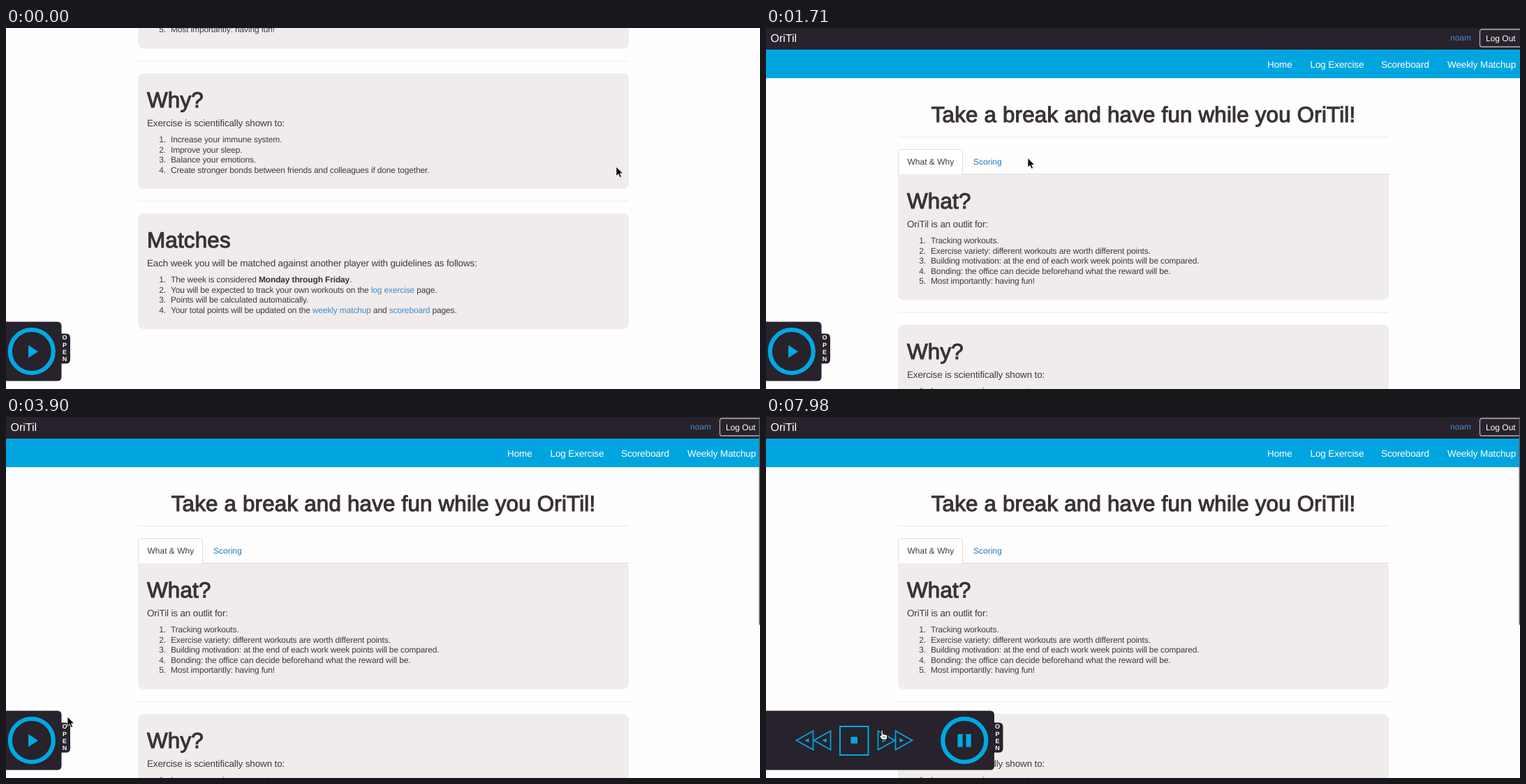
Write an HTML page that moves like this. It is 1080x518 px and loops after 8 s.

```html
<!DOCTYPE html>
<html>
<head>
<meta charset="utf-8">
<style>
html, body { margin: 0; width: 100%; height: 100%; overflow: hidden; background: #fefefe; }
svg { display: block; }
text { font: 12px "Liberation Sans", Arial, sans-serif; fill: #413b3c; text-rendering: geometricPrecision; white-space: pre; }
.h { font-size: 31.4px; letter-spacing: .16px; fill: #3a3233; stroke: #3a3233; stroke-width: 1.1px; }
.p { font-size: 13.5px; letter-spacing: -.15px; }
.lead { font-size: 17.8px; letter-spacing: -.18px; }
.li { letter-spacing: -.15px; }
.nav { font-size: 13.5px; letter-spacing: -.1px; fill: #fff; }
.brand { font-size: 16px; fill: #fff; }
.w { fill: #fff; }
.open { font-size: 9px; font-weight: bold; fill: #fff; text-anchor: middle; }
.a { fill: #428bca; }
.tab { fill: #2378c3; }
.b { font-weight: bold; fill: #3a3233; }
.i { font-style: italic; }
</style>
</head>
<body>
<svg id="stage" width="1080" height="518"></svg>
<script>
const BLUE = '#00a9e2', DARK = '#27222b', PANEL = '#f0eceb';
const text = (x, y, s, cls = '', more = '') => `<text x="${x}" y="${y}" class="${cls}" ${more}>${s}</text>`;
const span = (cls, s) => `<tspan class="${cls}">${s}</tspan>`;
const link = s => span('a', s);
const rect = (x, y, w, h, fill, r = 0, more = '') =>
  `<rect x="${x}" y="${y}" width="${w}" height="${h}" rx="${r}" fill="${fill}" ${more}/>`;
const rule = y => rect(189, y, 703, 1, '#ececec');
const path = (d, fill, more = '') => `<path d="${d}" fill="${fill}" ${more}/>`;
const group = (id, s) => `<g id="${id}">${s}</g>`;

const panel = (y, h, flatTop) => rect(189, y, 703, h, PANEL, 8) + (flatTop ? rect(189, y, 703, 12, PANEL) : '');
const list = (y, items) => items.map((s, i) =>
  text(229, y + i * 14.6, i + 1 + '.', 'li', 'text-anchor="end"') + text(236, y + i * 14.6, s, 'li')).join('');
const section = (y, title, intro, items, flatTop) =>
  panel(y, 107.6 + items.length * 14.6, flatTop) + text(202, y + 49, title, 'h') +
  text(202, y + 76, intro, 'p') + list(y + 99, items);

const why =
  section(210, 'What?', 'OriTil is an outlit for:', [
    'Tracking workouts.',
    'Exercise variety: different workouts are worth different points.',
    'Building motivation: at the end of each work week points will be compared.',
    'Bonding: the office can decide beforehand what the reward will be.',
    'Most importantly: having fun!'], true) + rule(408) +
  section(426, 'Why?', 'Exercise is scientifically shown to:', [
    'Increase your immune system.',
    'Improve your sleep.',
    'Balance your emotions.',
    'Create stronger bonds between friends and colleagues if done together.']) + rule(609) +
  section(627, 'Matches', 'Each week you will be matched against another player with guidelines as follows:', [
    `The week is considered ${span('b', 'Monday through Friday')}.`,
    `You will be expected to track your own workouts on the ${link('log exercise')} page.`,
    'Points will be calculated automatically.',
    `Your total points will be updated on the ${link('weekly matchup')} and ${link('scoreboard')} pages.`]);

const scoring =
  panel(210, 135.5, true) + text(202, 259, 'Scoring is completed automatically.', 'h') +
  text(202, 290, `Simply log your workouts on the ${link('log exercise')} page.`, 'lead') +
  text(202, 320, `Points will be converted based on activity into a ${span('i', 'points per hour')} (PPH) format.`, 'lead') +
  rule(362.5) + panel(380.5, 180) + text(202, 429.5, 'High Intensity Exercise: 7000 PPH', 'h') +
  text(202, 461, 'This is meant to encapsulate things that are anerobic exercises, like:', 'lead') +
  list(485.5, ['Weight lifting.', 'Circuit training.', 'Grindolt.']);

const bars =
  rect(0, 0, 1080, 31, DARK) + rect(0, 31, 1080, 41, '#00a5df') +
  text(6.5, 19.5, 'OriTil', 'brand') + text(980, 18, 'noam', 'a') +
  rect(1022.5, 2, 70, 25, 'none', 3, 'stroke="#b4b2b5" stroke-width="1.3"') + text(1031, 18.5, 'Log Out', 'w') +
  [[718, 'Home'], [779.5, 'Log Exercise'], [881, 'Scoreboard'], [976, 'Weekly Matchup']]
    .map(([x, s]) => text(x, 57, s, 'nav')).join('');

const tabs = [{ x: 189.5, w: 92, s: 'What &amp; Why', tx: 202.5 }, { x: 283.5, w: 69, s: 'Scoring', tx: 297 }];
const drawTabs = (active, hover) => rect(189, 209, 703, 1, '#ddd') + tabs.map((b, i) => {
  const shape = `M${b.x} 210V177.5q0-3 3-3h${b.w - 6}q3 0 3 3V210`;
  return (i == active ? path(shape, '#fff', 'stroke="#ddd"') : i == hover ? path(shape, '#eee') + rect(b.x, 209, b.w, 1, '#ddd') : '') +
    text(b.tx, 196, b.s, i == active ? '' : 'tab');
}).join('');

// Player, drawn in its open position
const arrowhead = (x, dir) =>
  path(`M${x} 450.5v27l${24 * dir}-13.5z`, 'none', `stroke="${BLUE}" stroke-width="1.7"`) +
  path(`M${x + 6 * dir} 461v6l${6 * dir}-3z`, BLUE);
const player =
  path('M320 438.5h13.5q6 0 6 6v31q0 6-6 6H320z', DARK) +
  path('M0 421.5h321q6 0 6 6v73q0 6-6 6H0z', DARK) +
  [...'OPEN'].map((c, i) => text(331.5, 447.3 + i * 10.2, c, 'open')).join('') +
  arrowhead(67.5, -1) + arrowhead(92.5, -1) + arrowhead(160.5, 1) + arrowhead(185.5, 1) +
  rect(106, 444, 40.5, 41, 'none', 0, `stroke="${BLUE}" stroke-width="2"`) + rect(121.5, 459, 9.5, 9.5, BLUE) +
  `<circle cx="284.3" cy="464" r="31" fill="none" stroke="${BLUE}" stroke-width="6.2"/>` +
  group('play', path('M279.5 455v18.5l14-9.3z', BLUE)) +
  group('pause', rect(274.5, 455, 7.2, 18.5, BLUE) + rect(286.5, 455, 7.2, 18.5, BLUE));

const $ = id => document.getElementById(id);
$('stage').innerHTML =
  group('page', text(540.5, 134.5, 'Take a break and have fun while you OriTil!', 'h', 'text-anchor="middle"') + rule(156) +
    group('why', why) + group('scoring', scoring) + group('tabs', '') + bars) +
  group('thumb', '') +
  group('bubble', path('M0 513.5h354q4 0 4 4v1H0z', '#000') + text(3, 524, 'http://localhost:3000/#', 'w')) +
  group('player', player) +
  group('arrow', path('M0 0V13.5L3.2 10.6 5.3 15.5 7.6 14.5 5.5 9.8H9.7z', '#000', 'stroke="#fff" stroke-width=".8"')) +
  group('hand', path('M3 8V1.5a1.2 1.2 0 0 1 2.4 0V6l5 1q1.6 .5 1.4 2l-.8 5H4L.6 9.4q0-1.4 1.4-1.2z', '#fff', 'stroke="#000" stroke-width="1"') +
    path('M6 8.5v3M8.2 8.8v2.7', 'none', 'stroke="#000" stroke-width=".7"'));

// Cursor moves: first step, last step, number of steps, end point, upward bow
const moves = [
  [1010, 1010, 1, 695, 199], [1180, 1920, 9, 335, 185], [2420, 2420, 1, 311, 185],
  [2570, 2690, 2, 237, 193], [3020, 3020, 1, 238, 193], [3350, 3350, 1, 212, 224],
  [3500, 3900, 4, 88, 430], [3990, 4230, 4, 76, 452], [4310, 4570, 4, 39, 462],
  [5580, 5580, 1, 40, 464], [6000, 6700, 8, 79, 458], [7510, 7980, 6, 162, 449, 8]];

function cursorAt(t) {
  let x = 874, y = 199;
  for (const [from, to, n, ex, ey, bow = 0] of moves) {
    if (t < from) break;
    const k = n > 1 ? Math.min(n - 1, Math.floor((t - from) / (to - from) * (n - 1) + 1e-6)) : 0;
    const p = (k + 1) / n, e = 1 - (1 - p) ** 2;
    x += (ex - x) * e;
    y += (ey - y) * e - bow * Math.sin(Math.PI * p);
  }
  return [x, y];
}

const show = (id, opacity) => $(id).setAttribute('opacity', +opacity);
const move = (id, x, y) => $(id).setAttribute('transform', `translate(${x} ${y})`);
let tabState = '';

function draw(t) {
  const [x, y] = cursorAt(t);
  const onScoring = t >= 2040 && t < 3170;
  const active = +onScoring;
  const over = t > 740 && y > 174 && y < 210 ? tabs.findIndex(b => x >= b.x && x < b.x + b.w) : -1;
  const hover = over == active ? -1 : over;

  move('page', 0, -(t < 150 ? 361 : t < 390 ? 287 : t < 570 ? 112.5 : t < 740 ? 30 : 0));
  if (tabState != active + ',' + hover) {
    tabState = active + ',' + hover;
    $('tabs').innerHTML = drawTabs(active, hover);
  }
  show('why', !onScoring);
  show('scoring', onScoring ? (t < 2160 ? .5 : 1) : 0);
  $('thumb').innerHTML = t < 2570 ? '' : rect(1078.6, 2, 1.4, t < 3170 ? 248 : 296, '#5c5a5e');
  show('bubble', t >= 1800 && t < 3600);

  move('player', t < 7060 ? -247.5 : 0, 0);
  show('play', t < 4920);
  show('pause', t >= 4920);

  const hand = hover >= 0 || t >= 4310;
  show('hand', hand);
  show('arrow', !hand);
  move(hand ? 'hand' : 'arrow', x, y);
}

const start = performance.now();
(function tick() {
  draw((performance.now() - start) % 8000);
  requestAnimationFrame(tick);
})();
</script>
</body>
</html>
```
